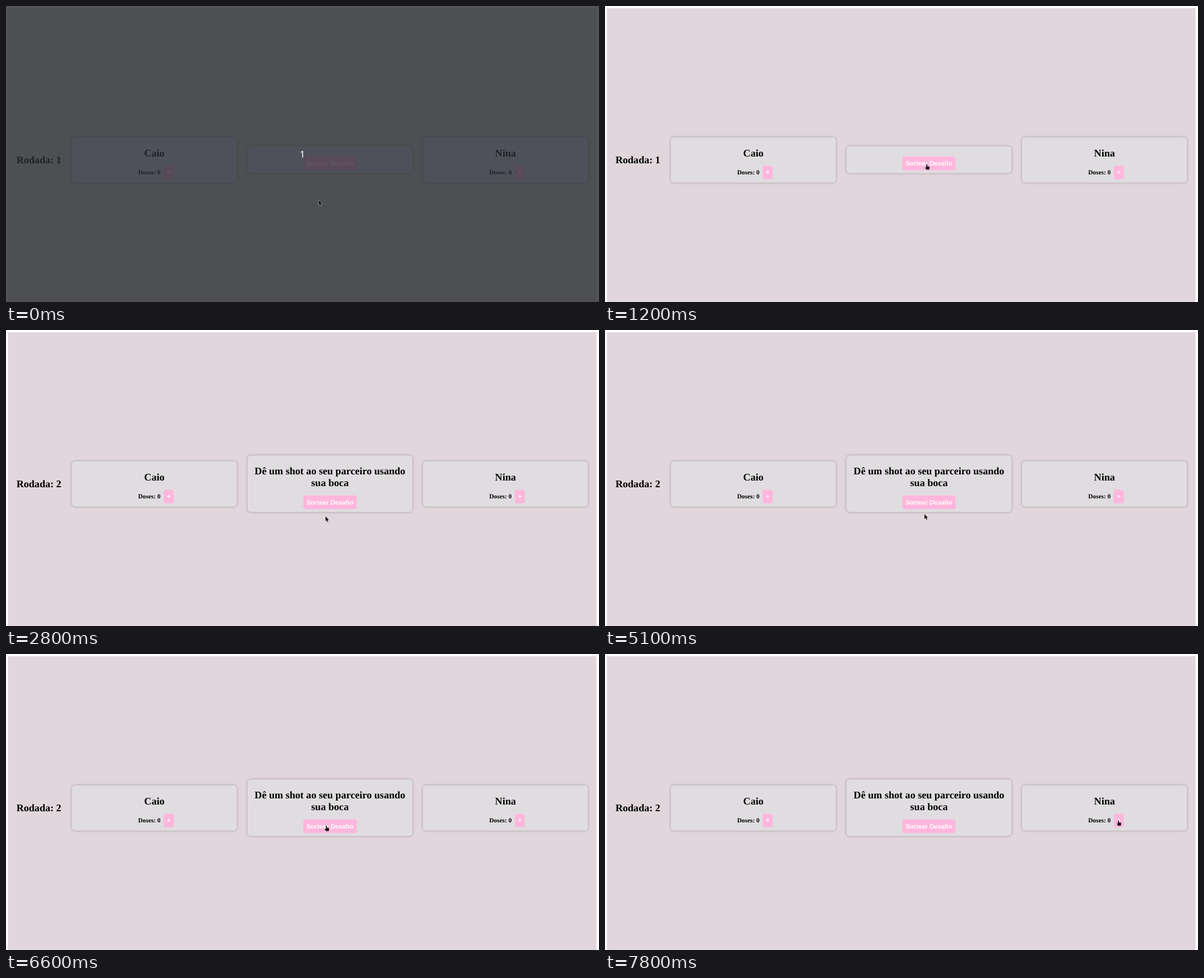
An HTML page for the animation above (8000 ms loop, 1058 by 529 pixels).

```html
<!DOCTYPE html>
<html lang="pt">
<head>
<meta charset="utf-8">
<title>Rodada</title>
<style>
  html, body { margin: 0; height: 100%; overflow: hidden; }
  svg {
    display: block; width: 100vw; height: 100vh; text-rendering: geometricPrecision;
    --edge: #fff; --page: #e1d6db; --card: #e0dde0; --ink: #000;
    --button: #ffb6dc; --label: #fff; --shade: rgba(0, 0, 0, .3);
  }
  svg.dim {
    --edge: #545559; --page: #4e4f53; --card: #4e5159; --ink: #202226;
    --button: #574a59; --label: #6b5564; --shade: rgba(0, 0, 0, .14);
  }
  .edge { fill: var(--edge); }
  .page { fill: var(--page); }
  .card { fill: var(--card); filter: drop-shadow(0 0 2.3px var(--shade)); }
  .button { fill: var(--button); }
  text { fill: var(--ink); font: bold 18.1px "Liberation Serif", serif; }
  .mid { text-anchor: middle; }
  .small { font-size: 11.34px; }
  .label { fill: var(--label); font: bold 11.34px "Liberation Sans", sans-serif; text-anchor: middle; }
  #count { fill: #fff; font: 17px "Noto Sans", sans-serif; text-anchor: middle; }
  #cursor path { fill: #141414; stroke: #eee; stroke-width: .8; stroke-linejoin: round; paint-order: stroke; }
  #cursor #beam { fill: none; stroke: #222; }
</style>
</head>
<body>
<svg id="stage" viewBox="0 0 1058 529">
  <rect class="edge" width="1058" height="529"/>
  <rect class="page" x="3.5" y="4" width="1050" height="525"/>
  <text id="round" x="18.7" y="281"></text>

  <rect class="card" x="117.5" y="234.7" width="294.3" height="80.8" rx="6"/>
  <text class="mid" x="264.7" y="269">Caio</text>
  <text class="small" x="235.7" y="301">Doses: 0</text>
  <rect class="button" x="281.4" y="285.4" width="17.7" height="24.3" rx="3.5"/>
  <text class="label" x="290.3" y="301">+</text>

  <rect class="card" id="challenge" x="430.8" width="294.3" rx="6"/>
  <g id="title">
    <text class="mid" x="578" y="258">Dê um shot ao seu parceiro usando</text>
    <text class="mid" x="578" y="279">sua boca</text>
  </g>
  <g id="draw">
    <rect class="button" x="530.4" y="269" width="95.2" height="24.4" rx="3.5"/>
    <text class="label" x="578" y="285">Sortear Desafio</text>
  </g>

  <rect class="card" x="744" y="234.7" width="294.3" height="80.8" rx="6"/>
  <text class="mid" x="891.2" y="269">Nina</text>
  <text class="small" x="862.2" y="301">Doses: 0</text>
  <rect class="button" x="907.9" y="285.4" width="17.7" height="24.3" rx="3.5"/>
  <text class="label" x="916.8" y="301">+</text>

  <text id="count" x="528.8" y="271">1</text>
  <g id="cursor">
    <path id="arrow" d="M0 0V8.8L2 7L3.5 10.3L4.9 9.7L3.5 6.5H6.2Z"/>
    <path id="hand" d="M-.9 .8Q0-.4 .9 .8V4L4.4 4.6Q5 4.8 5 5.6L4.4 10H-.6L-3 6.3Q-2.6 5.2-.9 6.4Z"/>
    <path id="beam" d="M-1.8-5.5H1.8M0-5.5V5.5M-1.8 5.5H1.8"/>
  </g>
</svg>
<script>
const LOOP = 8000, STEP = 100, DRAWN = 1700;
const $ = id => document.getElementById(id);

// Pointer path: time, x, y
const path = [
  [300, 558, 347], [500, 554, 342], [1200, 574, 282.5],
  [2100, 573.5, 282.5], [2500, 568.5, 310], [2800, 570, 333],
  [5000, 570, 333], [5100, 570, 329], [5600, 568.5, 306.5],
  [6500, 568.5, 306.5], [6600, 571.5, 306.5], [7400, 901, 297],
  [7600, 918, 296], [7800, 916, 297]
];

function pointerAt(t) {
  const next = path.findIndex(key => key[0] > t);
  if (next === 0) return path[0].slice(1);
  if (next < 0) return path[path.length - 1].slice(1);
  const [t0, x0, y0] = path[next - 1], [t1, x1, y1] = path[next];
  const u = (t - t0) / (t1 - t0), ease = u * u * (3 - 2 * u);
  return [x0 + (x1 - x0) * ease, y0 + (y1 - y0) * ease];
}

const within = (x, y, left, top, right, bottom) =>
  x >= left && x <= right && y >= top && y <= bottom;

function shapeAt(x, y, shift) {
  if (within(x, y, 530, 269 + shift, 626, 293.5 + shift) || within(x, y, 908, 285, 926, 310)) return "hand";
  return within(x, y, 862, 290, 903, 304) ? "beam" : "arrow";
}

function render(t) {
  const drawn = t >= DRAWN, shift = drawn ? 26.5 : 0, dim = t < 100;
  $("stage").classList.toggle("dim", dim);
  $("count").style.display = dim ? "" : "none";
  $("round").textContent = "Rodada: " + (drawn ? 2 : 1);
  $("title").style.display = drawn ? "" : "none";
  $("challenge").setAttribute("y", 250.8 - shift);
  $("challenge").setAttribute("height", 48 + 2 * shift);
  $("draw").setAttribute("transform", `translate(0 ${shift})`);

  const [x, y] = pointerAt(t), shape = shapeAt(x, y, shift);
  $("cursor").setAttribute("transform", `translate(${x} ${y})`);
  for (const id of ["arrow", "hand", "beam"]) $(id).style.display = id === shape ? "" : "none";
}

const start = performance.now();
function tick() {
  const t = (performance.now() - start) % LOOP;
  render(Math.floor(t / STEP) * STEP);
  requestAnimationFrame(tick);
}
tick();
</script>
</body>
</html>
```
